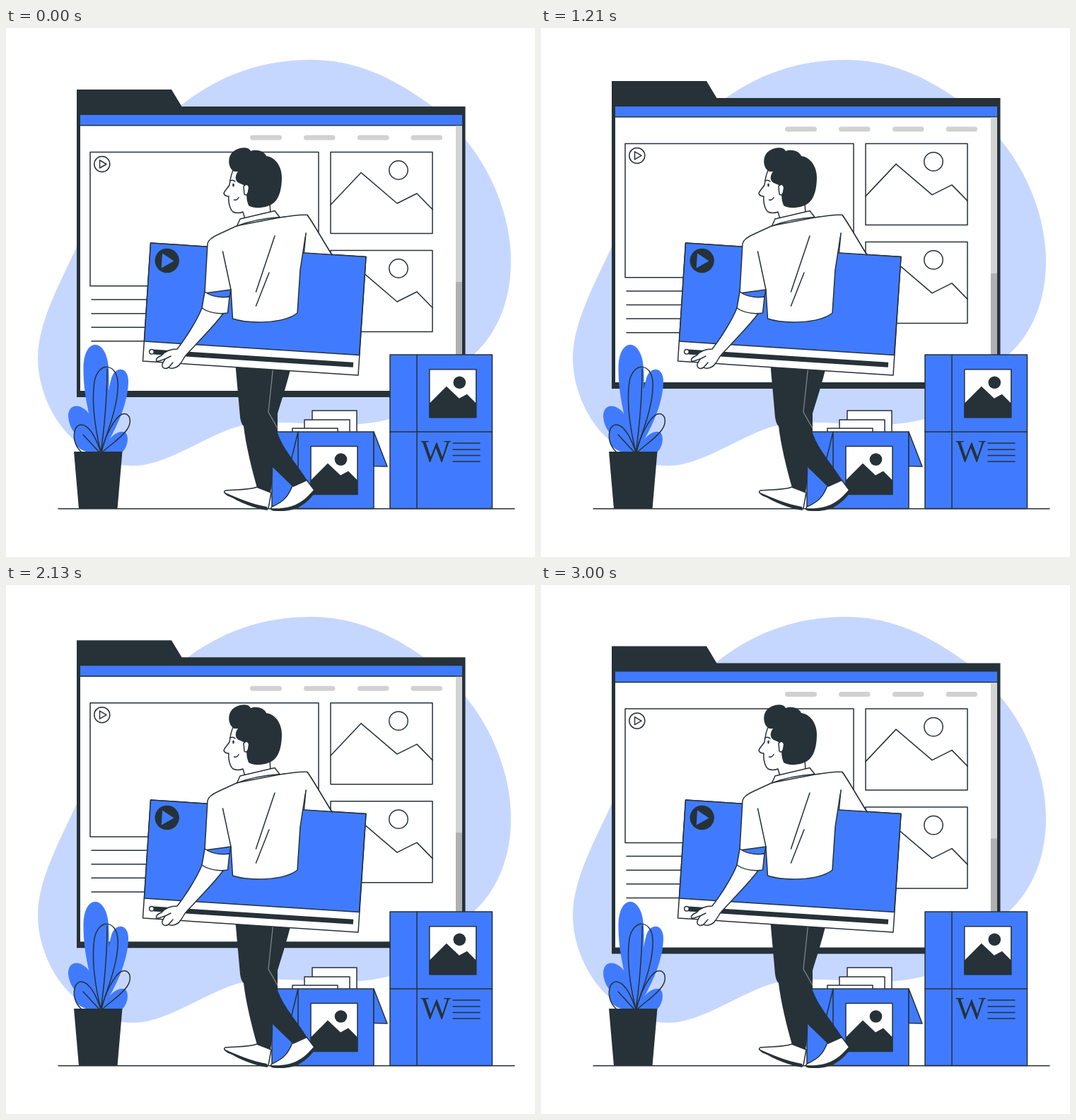
Animation of 748 by 748 pixels, one loop 3040 ms. Source, as an HTML page:

```html
<!DOCTYPE html>
<html lang="en">
<head>
<meta charset="utf-8">
<title>Arranging a page</title>
<style>
  html, body { margin: 0; height: 100%; overflow: hidden; background: #fff; }
  svg { display: block; width: 100vw; height: 100vh; }
  .line { fill: none; stroke: #263238; stroke-width: 1.5; stroke-linejoin: round; stroke-linecap: round; }
  .blue { fill: #407bff; }
  .dark { fill: #263238; }
  .white { fill: #fff; }
  .none { stroke: none; }
</style>
</head>
<body>
<svg viewBox="0 0 748 748">
  <defs>
    <g id="photo" class="line">
      <path class="white" d="M459 175.5H603V290.5H459Z"/>
      <path d="M459 250L502 204.500L553 248L581 234L603 256.500"/>
      <circle cx="555" cy="201" r="13.200"/>
    </g>
    <g id="card">
      <path class="line white" d="M0 0H66V68H0Z"/>
      <path class="dark" d="M0 48L24 24L42 41L53 35L66 48V68H0Z"/>
      <circle class="dark" cx="42.500" cy="18.500" r="8.800"/>
    </g>
  </defs>

  <path fill="#c6d7ff" d="M431 45C500 45 552 74 602 110C622 124 636 141 649 157C686 201 714 266 714 330C714 385 695 432 660 463C622 495 600 538 543 553C470 572 400 549 334 562C290 572 236 613 190 618.500C150 622 118 606 97 583C68 559 45 512 45 467C45 415 78 358 101 307C150 215 200 142 248 109C300 68 360 45 431 45Z"/>

  <g id="folder">
    <path class="dark" d="M100 87H234L248.500 111H649.500V522H100Z"/>
    <path class="white" d="M105 138H645V513H105Z"/>
    <path class="blue" d="M105 123H645V137.500H105Z"/>
    <path class="line" d="M105 137.800H645"/>
    <path fill="#d3d3d3" d="M636 138.500H645V513H636Z"/>
    <path fill="#b0b0b0" d="M636 359H645V513H636Z"/>
    <path fill="none" stroke="#d1d1d1" stroke-width="7" stroke-linecap="round" d="M348.500 155H386.500M424.500 155H462M500.500 155H538M576 155H613.500"/>
    <g class="line">
      <path d="M119 175.500H442V364.800H119Z"/>
      <circle cx="135.800" cy="192.500" r="11"/>
      <path d="M132.500 187V198L142 192.500Z"/>
      <path d="M121 384H230M121 403.700H230M121 423.200H230M121 442.800H230"/>
    </g>
    <use href="#photo"/>
    <use href="#photo" y="139"/>
  </g>

  <path class="line" d="M74 679.800H719"/>

  <g id="plant">
    <g class="blue">
      <path d="M132 600C120 560 109 520 109.500 481C110 436 142 438 145 480C148 520 139 565 135 600Z"/>
      <path d="M133 600C137 565 142 520 149 495C155 477 174 479 173 501C172 535 153 573 135 600Z"/>
      <path d="M133 600C103 584 88 568 88 547C90 528 111 532 121 551C129 567 132 585 133 600Z"/>
      <path d="M130 600C109 602 96 593 96 577C99 560 111 557 120 566C128 575 132 589 134 600Z"/>
      <path d="M134 600C142 582 158 566 169 572C175 579 171 594 164 600Z"/>
    </g>
    <g class="line">
      <path d="M134 600C125 562 121 528 125 500C130 472 156 473 158 500C160 532 143 572 134 600Z"/>
      <path d="M107 600C97 591 94 578 98 567C106 553 122 563 134 600"/>
      <path d="M135 600C140 577 153 551 164 546C177 543 178 558 171 568C161 582 146 590 136 600"/>
      <path d="M143 482C143 519 139 568 134 600M109 575L132 600"/>
    </g>
    <path class="dark" d="M96 599H164.500L157.500 680H103Z"/>
  </g>

  <g id="boxes">
    <g class="line">
      <path class="white" d="M433 541H496V580H433Z"/>
      <path class="white" d="M422 554H486V580H422Z"/>
      <path class="white" d="M405 566H469V580H405Z"/>
      <path class="blue" d="M376 571H520V679.500H376Z"/>
      <path class="blue" d="M520 571L539 620L520 619.500Z"/>
      <path d="M413 571V679.500M413 571L403 612"/>
      <path class="blue" d="M543 462H687.500V679.500H543Z"/>
      <path d="M543 571H687.500M581 462V679.500"/>
      <path d="M632 587H670M632 596H670M632 604.500H670M632 613H670"/>
    </g>
    <use href="#card" x="431" y="591.500"/>
    <use href="#card" x="598.800" y="482.700"/>
    <text class="dark" x="586.500" y="612.500" font-size="45" font-family="'Liberation Serif', Times, serif">W</text>
  </g>

  <g id="legs">
    <g class="line">
      <path class="white" d="M355 649C342 654 325 652 310 654C307 656 309 658 314 661L366 680L371 679L375 657Z"/>
      <path class="white" d="M406 645C400 660 395 669 376 677C373 680 375 682 382 682C410 683 424 671 437 655L425 639Z"/>
    </g>
    <path class="dark" d="M308 656C325 664 347 673 369 677L370 682C352 680 322 668 308 656ZM374 679C405 681 420 671 435 653L438 656C425 673 411 683 389 683C379 683 374 682 374 679Z"/>
    <path class="dark" d="M320 410L325 483L331 550Q332 559 336 563C339 589 347 622 355 650L374 657Q378 635 377 621L406 649L426 640C412 617 393 598 384 573V545C394 512 403 486 408 453L412 403Z"/>
    <path fill="none" stroke="#7c8488" stroke-width="1.300" d="M391 460L379 467.500L371 543L384 566"/>
  </g>

  <g id="board">
    <path class="line white" d="M386 268L426 264.500C435 277 440 287 461 321L420 330Z"/>
    <path class="line white" d="M204.500 304L509 323.500L498 491L193.500 471Z"/>
    <path class="line blue" d="M204.500 304L509 323.500L499.500 462.500L195.500 443Z"/>
    <path class="line" stroke-linecap="butt" d="M209 458L491 476.300" style="stroke-width:7;stroke-linecap:butt"/>
    <circle class="line white" cx="206" cy="457.800" r="3.300"/>
    <circle class="dark" cx="227.700" cy="329" r="17.200"/>
    <path class="blue" d="M221 318.500L237.500 329.500L219.700 339.500Z"/>
  </g>

  <g id="body" class="line">
    <path class="white" d="M277 396C270 414 253 440 242 454C234 454 225 457 220 463C215 465 211 468 213 471C217 472 220 469 225 468C222 473 219 477 222 480C225 483 228 481 230 480C234 483 243 480 246 475C250 471 251 466 255 462L281 434Q297 417 307 404Z"/>
    <path d="M225 468L233 464M230 480L236 473"/>
    <path class="white none" d="M386 268L426 264.500C434 276 439 285 450 304L459 319.500L420 317L424 290Z"/>
    <path class="white" d="M327 279.500L302 291Q286 298 285 305L281 375L318 370L320.500 411C342 418 392 419 412 403L416 342L424 290L426 264.500Q417 263 387 268Z"/>
    <path class="white none" d="M419 266L426 265L430 272L424 292L417 306Z"/>
    <path d="M424 290L421.500 317M426 264.500C435 277 440 287 461 321"/>
    <path class="white" d="M281 373Q295 383 316 380L313.500 403Q292 406 277 396Z"/>
    <path d="M306.500 316L318 370L316 380"/>
    <path d="M380 294L353.500 373M372 346L353.500 393"/>
  </g>

  <g id="head">
    <path class="line white" d="M322 199C318 207 317 214 316 222C313 227 309 230 308 234C309 237 312 238 315 238C314 247 317 257 321 260Q328 263 335 260L338 270L374 262L373 247L368 200Z"/>
    <path class="line white" d="M331 270L380 258.500L387 267.500Q352 270 326.500 280Z"/>
    <path class="dark" d="M323 203C314 199 313 184 319 177C326 169 342 166 346 174C353 171 365 173 368 181C382 183 390 197 390 211C390 226 387 239 380 246C372 254 353 257 343 251Q340 244 340 236L336 222L329 219C324 216 323 210 328 203Z"/>
    <path class="line white" d="M336 224C340 218 345 223 343 229C343 234 340 238 337 235Z"/>
    <path class="line" d="M322.500 243Q327 244 329 239.500M317 216Q321 214 324 217"/>
    <ellipse class="dark" cx="321.500" cy="222" rx="1.300" ry="2.500"/>
  </g>
</svg>
<script>
  const LOOP = 3040, PEAK = 1500, RISE = 15;
  const folder = document.getElementById('folder');
  const start = performance.now();

  function draw(now) {
    const t = Math.max(0, now - start) % LOOP;
    const lift = t < PEAK ? t / PEAK : (LOOP - t) / (LOOP - PEAK);
    folder.setAttribute('transform', `translate(0 ${-RISE * lift})`);
    requestAnimationFrame(draw);
  }
  draw(start);
</script>
</body>
</html>
```
